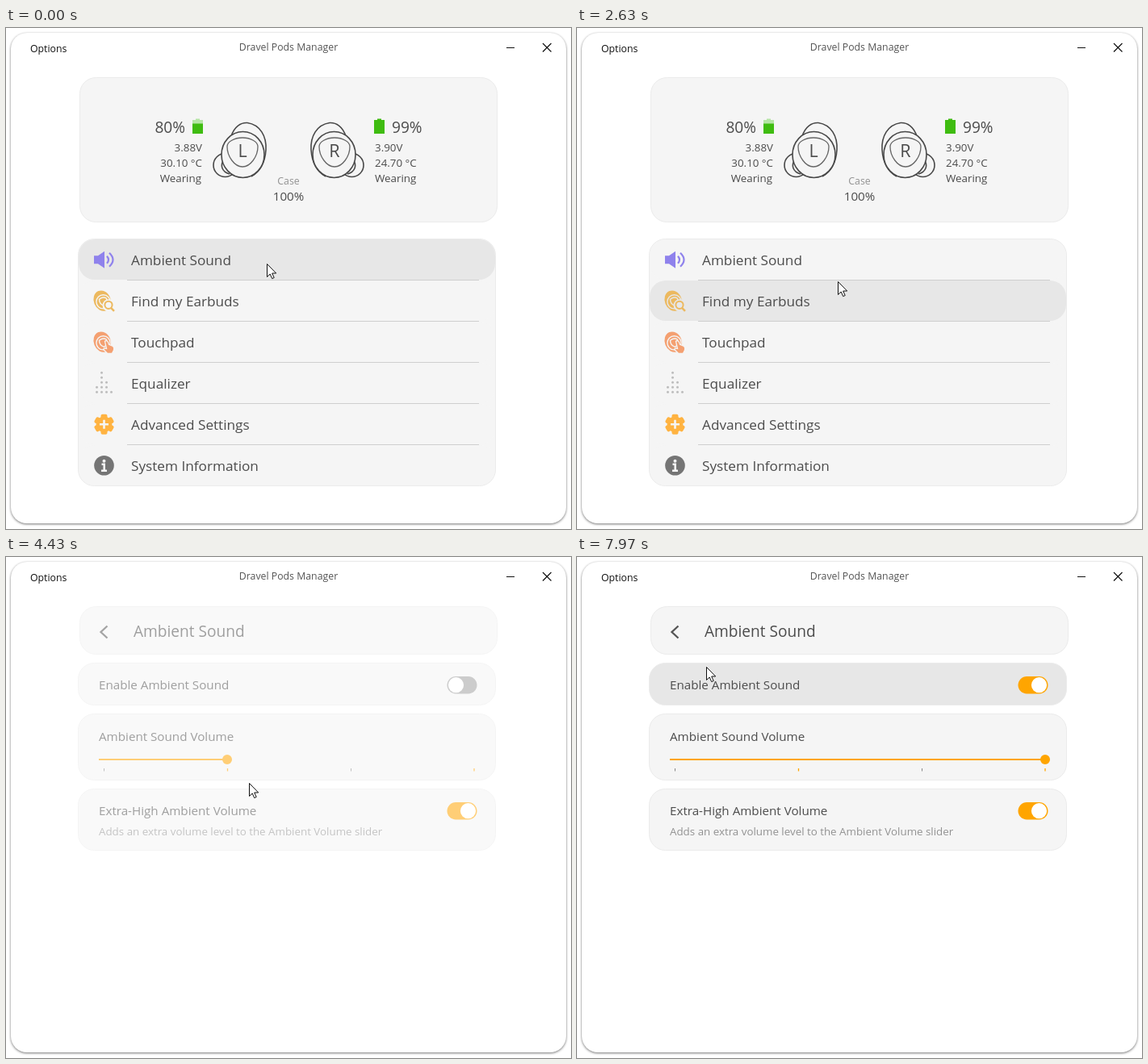
An HTML page that plays this animation: 700 px wide and 621 px high, repeating every 8 s.

```html
<!DOCTYPE html>
<html lang="en">
<head>
<meta charset="utf-8">
<title>Dravel Pods Manager</title>
<style>
  html, body { margin: 0; width: 100%; height: 100%; overflow: hidden; background: #fff; }
  svg { display: block; font-family: "Open Sans", "Noto Sans", sans-serif; fill: none; }
  text { fill: #4c4c4c; }
  .window { fill: #fff; filter: drop-shadow(0 1px 1.5px rgba(0, 0, 0, .55)); }
  .panel { fill: #f5f5f5; stroke: #ebebeb; }
  .row { --bg: #f5f5f5; }
  .row.hover { --bg: #e7e7e7; }
  .row > rect { fill: var(--bg); }
  .panel.hover { fill: #e7e7e7; }
  .s13 { font-size: 12.3px; }
  .s14 { font-size: 13.35px; }
  .s16 { font-size: 15.2px; }
  .s18 { font-size: 17.2px; }
  .s20 { font-size: 19.1px; }
  .dim { fill: #929292; }
  .end { text-anchor: end; }
  .mid { text-anchor: middle; }
  .bud { stroke: #484848; stroke-width: 1.6; fill: #f5f5f5; }
  .bg-fill { fill: var(--bg); }
  .bg-line { stroke: var(--bg); }
</style>
</head>
<body>
<svg width="700" height="621" viewBox="0 0 700 621">
  <defs>
    <g id="bud" class="bud">
      <path d="M279 134C283 122 291 117 299 117.500C315 120 323 134 322 151C321 166 315 178 304 184"/>
      <circle cx="271.500" cy="170" r="14.500"/>
      <path d="M270 163c-5 7-3 15 7 18"/>
      <ellipse cx="293.500" cy="157" rx="26.500" ry="28.500"/>
      <path d="M293 136c10 0 19 5 19 11 0 12-9 25-19 25s-19-13-19-25c0-6 9-11 19-11z" stroke="#666" stroke-width="1.300"/>
    </g>
  </defs>

  <rect class="window" x="6" y="6" width="688" height="608" rx="20"/>
  <text class="s13" x="30" y="30" style="fill:#111">Options</text>
  <text class="s13 mid" x="350" y="28" style="fill:#555">Dravel Pods Manager</text>
  <path d="M620 24.500h10M665 19l10.500 10.500M675.500 19l-10.500 10.500" stroke="#111" stroke-width="1.200"/>

  <g id="home">
    <rect class="panel" x="91.500" y="61.500" width="517" height="179" rx="20"/>
    <use href="#bud"/>
    <use href="#bud" transform="matrix(-1 0 0 1 700 0)"/>
    <g class="mid" font-size="21.500">
      <text x="293" y="160">L</text><text x="407" y="160">R</text>
    </g>
    <path d="M231 119v-5h4v-1.500h5v1.500h4v5z" fill="#b5e5a5"/>
    <path d="M231 118.500h13v12.500h-13zM456 131v-17h4v-1.500h5v1.500h4v17z" fill="#3fbc10"/>
    <text class="s20 end" x="222" y="130">80%</text>
    <text class="s20" x="478" y="130">99%</text>
    <g class="s14 end">
      <text x="243" y="153">3.88V</text><text x="243" y="172">30.10 °C</text><text x="242" y="191">Wearing</text>
    </g>
    <g class="s14">
      <text x="457" y="153">3.90V</text><text x="457" y="172">24.70 °C</text><text x="457" y="191">Wearing</text>
    </g>
    <text class="s13 mid dim" x="350" y="194">Case</text>
    <text class="s16 mid" x="350" y="214">100%</text>
    <rect class="panel" x="89.500" y="261.500" width="517" height="306" rx="20"/>
    <g id="menu"></g>
  </g>

  <g id="detail">
    <rect class="panel" x="91.500" y="61.500" width="517" height="59" rx="20"/>
    <rect class="panel" id="enableRow" x="89.500" y="131.500" width="517" height="52" rx="20"/>
    <rect class="panel" x="89.500" y="194.500" width="517" height="82" rx="20"/>
    <rect class="panel" x="89.500" y="287.500" width="517" height="76" rx="20"/>
    <path d="M125.500 85.500l-8 7.500 8 7.500" stroke="#555" stroke-width="2.300"/>
    <text class="s20" x="158" y="99">Ambient Sound</text>
    <text class="s16" x="115" y="164">Enable Ambient Sound</text>
    <text class="s16" x="115" y="228">Ambient Sound Volume</text>
    <text class="s16" x="115" y="320">Extra-High Ambient Volume</text>
    <text class="s14 dim" x="115" y="345">Adds an extra volume level to the Ambient Volume slider</text>
    <rect id="track" x="546.500" y="148" width="37" height="21.500" rx="10.750"/>
    <circle id="knob" cy="158.700" r="9.600" fill="#fff"/>
    <rect x="546.500" y="304" width="37" height="21.500" rx="10.750" fill="#ffa500"/>
    <circle cx="572.500" cy="314.700" r="9.600" fill="#fff"/>
    <path d="M121.500 262v3.500M427.500 262v3.500" stroke="#888"/>
    <path d="M274.500 262v3.500M580 262v3.500" stroke="#ffa500" stroke-width="1.300"/>
    <path id="level" stroke="#ffa500" stroke-width="2"/>
    <circle id="halo" cy="251" r="12" fill="#ffa500" opacity=".3"/>
    <circle id="thumb" cy="251" r="6" fill="#ffa500"/>
  </g>

  <path id="cursor" d="M.5.500v16l3.700-3.500 2.500 5.600 2.500-1.100-2.500-5.500h5z" fill="#fff" stroke="#111"/>
</svg>

<script>
const $ = id => document.getElementById(id);
const clamp = v => Math.max(0, Math.min(1, v));

// Icons are drawn around the centre of their row.
const budIcon = color => `
  <ellipse cx="-2" cy="-1" rx="10.5" ry="13" transform="rotate(-22)" fill="${color}"/>
  <circle cx="-1" cy="1" r="8.6" class="bg-line" stroke-width="1.4"/>
  <path d="M-6-2q5-4 9-1 2 6-3 9-6-2-6-8z" class="bg-line" stroke-width="1.4"/>`;

const dots = [2, 5, 3, 1].map((count, col) =>
  Array.from({ length: count }, (_, i) =>
    `<circle cx="${col * 6 - 9}" cy="${11 - i * 6}" r="1.5"/>`).join("")).join("");

const teeth = [0, 60, 120].map(a =>
  `<rect x="-4" y="-12.5" width="8" height="25" rx="2" transform="rotate(${a})"/>`).join("");

const items = [
  ["Ambient Sound", `<path d="M-12.500-5h5l8-5.500v21l-8-5.500h-5z" fill="#8f82ec"/>
    <path d="M3.500-4.500q4 4.500 0 9M6.500-8.500q9 8.500 0 17" stroke="#8f82ec" stroke-width="2.200"/>`],
  ["Find my Earbuds", budIcon("#ecb95f") + `<circle cx="5.500" cy="5.500" r="7.500" class="bg-fill"/>
    <path d="M8.500 8.500l4 4" stroke="#ecb95f" stroke-width="2.500"/>
    <circle cx="5.500" cy="5" r="4.600" stroke="#ecb95f" stroke-width="2"/>`],
  ["Touchpad", budIcon("#f4a071") + `<path d="M1-1q2-2 4 1l1 3 5 2q2 2 1 5l-2 4H4l-5-5q1-2 4-1z"
    fill="#f4a071" class="bg-line" stroke-width="1.300"/>`],
  ["Equalizer", `<g fill="#bdbdbd">${dots}</g>`],
  ["Advanced Settings", `<g fill="#ffb341"><circle r="9.800"/>${teeth}</g>
    <path d="M-5.500 0h11M0-5.500v11" class="bg-line" stroke-width="2.600"/>`],
  ["System Information", `<circle r="12.300" fill="#757575"/>
    <circle cy="-5.500" r="2" class="bg-fill"/>
    <path d="M-3-1.500h3.200v8M-3.500 6.500h7" class="bg-line" stroke-width="2.600"/>`],
];

$("menu").innerHTML = items.map(([label, icon], i) => `
  <g class="row" transform="translate(0 ${262 + 51 * i})">
    <rect x="90" width="516" height="50" rx="20"/>
    ${i < 5 ? '<path d="M150 50.500h436" stroke="#cfcfcf"/>' : ""}
    <g transform="translate(121.500 25.300)">${icon}</g>
    <text class="s18" x="155" y="32">${label}</text>
  </g>`).join("");
const rows = [...document.querySelectorAll(".row")];

// Pointer moves: start, end, x, y, ease-out power
const moves = [
  [0, 70, 322, 291], [600, 830, 321, 315, 2], [1037, 1670, 356, 508, 2],
  [1870, 2630, 323, 314, 1.3], [2630, 2700, 321, 305], [2700, 3230, 310, 282, 1.5],
  [3340, 3630, 304, 280, 1.5], [4070, 4400, 301, 280], [4800, 5030, 292, 229, 1.5],
  [5140, 5270, 287, 185], [5400, 5430, 280, 164], [5600, 5670, 278, 147],
  [5800, 5930, 280, 238], [6140, 6370, 275, 251, 2], [6450, 6970, 531, 259],
  [6970, 7000, 565, 259], [7140, 7970, 160, 136, 1.5],
];

function pointer(t) {
  let x = 323, y = 292;
  for (const [start, end, toX, toY, power = 1] of moves) {
    if (t < start) break;
    const p = 1 - (1 - clamp((t - start) / (end - start))) ** power;
    x += (toX - x) * p;
    y += (toY - y) * p;
  }
  return [Math.round(x), Math.round(y)];
}

function draw(t) {
  const [x, y] = pointer(t);
  const hoverY = pointer(t - 33)[1];  // hover trails the pointer slightly
  $("cursor").setAttribute("transform", `translate(${x} ${y})`);

  $("home").setAttribute("opacity", 1 - clamp((t - 4050) / 200));
  $("detail").setAttribute("opacity", clamp((t - 4330) / 190));
  const active = Math.floor((hoverY - 264.5) / 51);
  rows.forEach((row, i) => row.classList.toggle("hover", i === active));
  $("enableRow").classList.toggle("hover", hoverY > 130 && hoverY < 185);

  const on = t >= 5720;
  $("track").setAttribute("fill", on ? "#ffa500" : "#a0a0a0");
  $("knob").setAttribute("cx", on ? 572.5 : 557.5);

  const level = t < 6600 ? 274 : t < 6990 ? 427 : 580;
  $("level").setAttribute("d", `M115 251H${level}`);
  $("thumb").setAttribute("cx", level);
  $("halo").setAttribute("cx", level);
  $("halo").setAttribute("visibility", t > 6400 && t < 7170 ? "visible" : "hidden");
}

function tick() {
  draw(performance.now() % 8000);
  requestAnimationFrame(tick);
}
tick();
</script>
</body>
</html>
```
